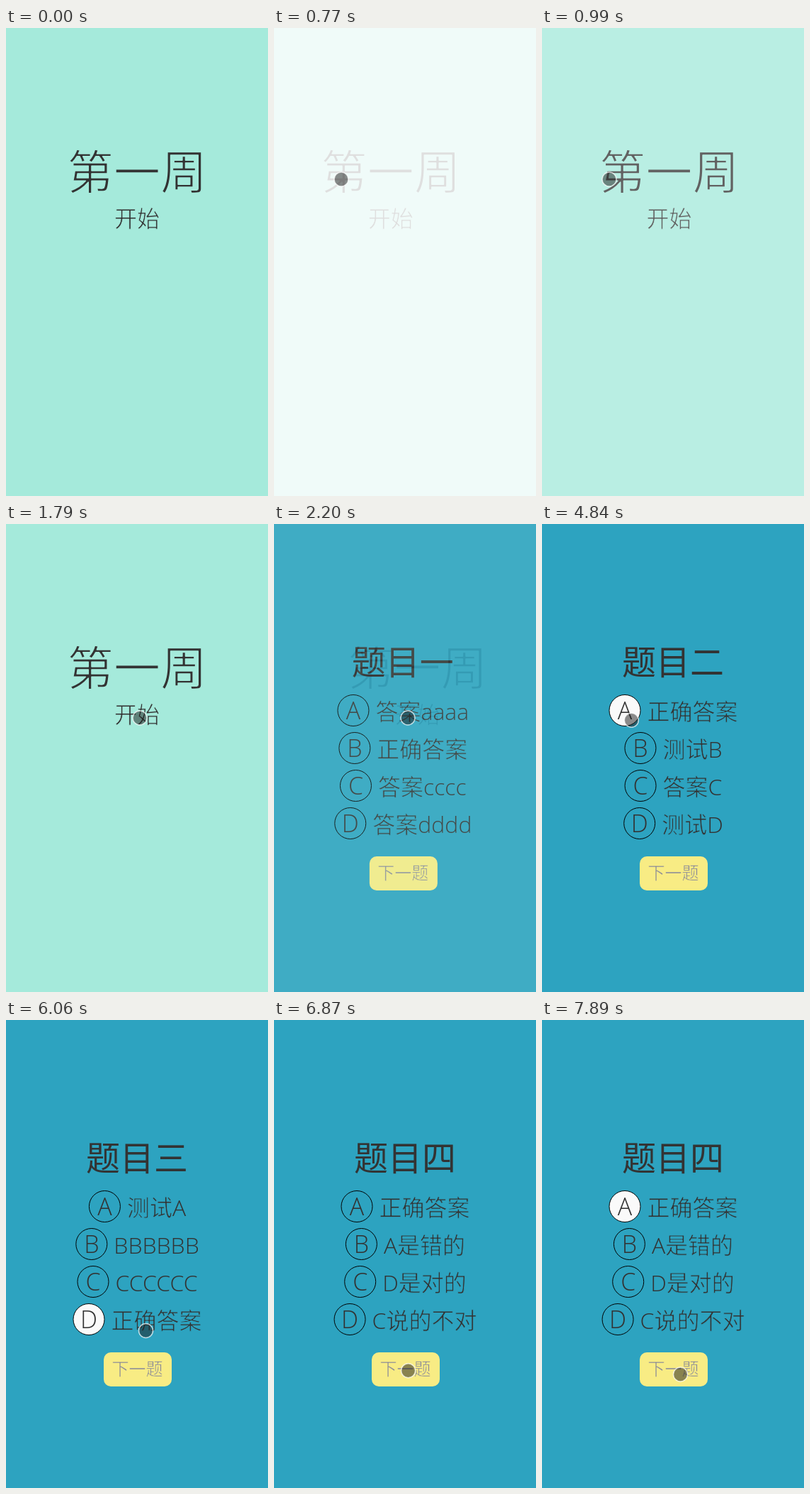
Write an HTML page with a canvas that moves like this. It is 370 by 659 pixels and loops after 8000 ms.

```html
<!DOCTYPE html>
<html lang="zh-CN">
<head>
<meta charset="utf-8">
<style>
  html, body { margin: 0; width: 100%; height: 100%; overflow: hidden; }
  canvas { display: block; }
</style>
</head>
<body>
<canvas id="stage" width="370" height="659"></canvas>
<script>
const LOOP = 8000, W = 370, H = 659, MID = 185;
const MINT = '#a5eadb', BLUE = '#2da3c0', YELLOW = '#f8ec84', INK = '#333';
const CJK = '"Noto Sans CJK SC", sans-serif';
const LATIN = '"Open Sans", sans-serif';

const screen = document.getElementById('stage').getContext('2d');
const layer = document.createElement('canvas');
layer.width = W;
layer.height = H;
const ctx = layer.getContext('2d');

// Low-rate recording: after a still opening, each picture holds for one STEP.
const FIRST = 768, STEP = 203;
const START_IN = 717, QUIZ_IN = 1902, ENTER = 330, DWELL = 400;

// Pointer stops: arrival time, x, y. After the first two they alternate option, button.
const stops = [[570, 95, 213], [1790, 189, 273],
  [2790, 115, 265], [3600, 182, 495], [4410, 126, 275], [5230, 186, 495],
  [5840, 197.5, 437.5], [6440, 190, 495], [7250, 117, 265], [7860, 195.5, 499]];

const questions = [
  { title: '题目一', pick: 0, rows: ['答案aaaa', '正确答案', '答案cccc', '答案dddd'] },
  { title: '题目二', pick: 0, rows: ['正确答案', '测试B', '答案C', '测试D'] },
  { title: '题目三', pick: 3, rows: ['测试A', 'BBBBBB', 'CCCCCC', '正确答案'] },
  { title: '题目四', pick: 0, rows: ['正确答案', 'A是错的', 'D是对的', 'C说的不对'] }
];

const clamp = v => Math.min(1, Math.max(0, v));
const smooth = v => v * v * (3 - 2 * v);

// Chinese text is made lighter by trimming its outline with the colour behind it.
function text(str, x, y, size, { back, color = INK, align = 'center' } = {}) {
  const runs = str.match(/[A-Za-z]+|[^A-Za-z]+/g).map(run => {
    const latin = /[A-Za-z]/.test(run);
    const font = latin ? `300 ${size}px ${LATIN}` : `400 ${size}px ${CJK}`;
    ctx.font = font;
    return { run, latin, font, width: ctx.measureText(run).width };
  });
  const total = runs.reduce((sum, r) => sum + r.width, 0);
  if (align === 'center') x -= total / 2;
  for (const { run, latin, font, width } of runs) {
    ctx.font = font;
    ctx.fillStyle = color;
    ctx.fillText(run, x, y);
    if (back && !latin) {
      ctx.strokeStyle = back;
      ctx.lineWidth = size * 0.026;
      ctx.lineJoin = 'round';
      ctx.strokeText(run, x, y);
    }
    x += width;
  }
  return total;
}

function startPage() {
  text('第一周', MID, 226.5, 66, { back: MINT });
  text('开始', MID, 280, 32, { back: MINT });
}

function option(label, index, selected) {
  const y = 262.5 + index * 53;
  const labelWidth = text(label, 0, -H, 32);
  const left = MID + 0.5 - (54 + labelWidth) / 2;
  ctx.beginPath();
  ctx.arc(left + 22.5, y, 22, 0, Math.PI * 2);
  ctx.fillStyle = selected ? '#fafafa' : BLUE;
  ctx.fill();
  ctx.strokeStyle = '#000';
  ctx.lineWidth = 1;
  ctx.stroke();
  text('ABCD'[index], left + 22.5, y + 12.5, 34);
  text(label, left + 54, y + 13, 32, { back: BLUE, align: 'left' });
}

function quizPage(t) {
  const left = i => stops[2 * i + 1][0] + DWELL;
  const current = questions.findLastIndex((q, i) => i === 0 || t >= left(i));
  const { title, pick, rows } = questions[current];
  const picked = t >= stops[2 + 2 * current][0];
  text(title, MID, 211.5, 48);
  rows.forEach((label, i) => option(label, i, picked && i === pick));
  ctx.fillStyle = YELLOW;
  ctx.beginPath();
  ctx.roundRect(138, 468, 96, 48, 10);
  ctx.fill();
  text('下一题', MID + 0.5, 500, 24, { back: YELLOW, color: '#85869a' });
}

function page(color, alpha, shift, content) {
  ctx.fillStyle = color;
  ctx.fillRect(0, 0, W, H);
  ctx.save();
  ctx.translate(shift, 0);
  content();
  ctx.restore();
  screen.globalAlpha = alpha;
  screen.drawImage(layer, 0, 0);
  screen.globalAlpha = 1;
}

function pointer(t) {
  const i = stops.findLastIndex(stop => stop[0] <= t);
  const [time, x, y] = stops[i];
  const [nextTime, nextX, nextY] = stops[i + 1] || stops[i];
  const depart = time + DWELL;
  const k = smooth(clamp((t - depart) / Math.max(1, nextTime - depart)));
  screen.beginPath();
  screen.arc(x + (nextX - x) * k, y + (nextY - y) * k, 10, 0, Math.PI * 2);
  screen.fillStyle = 'rgba(25,25,25,.5)';
  screen.fill();
  screen.strokeStyle = 'rgba(255,255,255,.7)';
  screen.lineWidth = 1.5;
  screen.stroke();
}

function draw(now) {
  const time = now % LOOP;
  const opening = time < FIRST;
  const t = opening ? 0 : FIRST + Math.floor((time - FIRST) / STEP) * STEP;
  const start = opening ? 1 : clamp((t - START_IN) / ENTER);
  const quiz = clamp((t - QUIZ_IN) / ENTER);
  screen.fillStyle = '#fff';
  screen.fillRect(0, 0, W, H);
  if (quiz < 1) page(MINT, start * (1 - 0.3 * quiz), 20 * quiz - 24 * (1 - start), startPage);
  if (quiz > 0) page(BLUE, quiz, -24 * (1 - quiz), () => quizPage(t));
  if (!opening) pointer(t);
}

function loop(now) {
  draw(now);
  requestAnimationFrame(loop);
}
requestAnimationFrame(loop);
</script>
</body>
</html>
```
